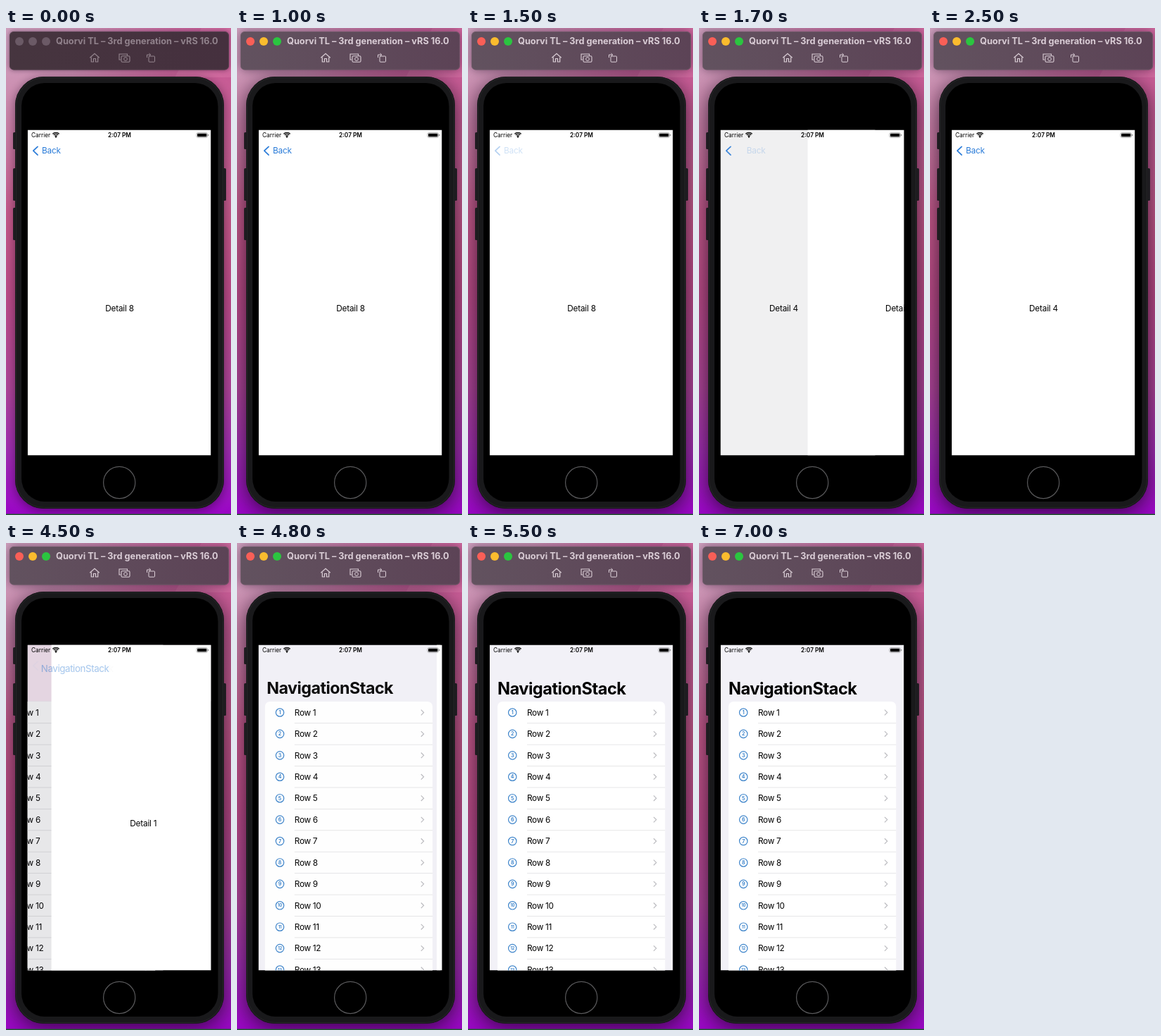
Write an HTML page with a canvas that moves like this. It is 320 by 691 pixels and loops after 7.1 s.

```html
<!DOCTYPE html>
<html lang="en">
<head>
<meta charset="utf-8">
<title>Navigation demo</title>
<style>
html, body { margin: 0; width: 100%; height: 100%; overflow: hidden; background: #a0509a; }
canvas { display: block; width: 320px; height: 691px; }
</style>
</head>
<body>
<canvas id="stage"></canvas>
<script>
const W = 320, H = 691, LOOP = 7100, STEP = 100;
const SCREEN = { x: 30.7, y: 144.5, w: 260.8, h: 462 };
const MID = 161.5, BLUE = '#2b7cd8', FONT = 'Inter, "Liberation Sans", sans-serif';
const ACTIVATE = 500;
// Each pop: time of press, start of the slide, page leaving, page below
const POPS = [
  { press: 1300, start: 1600, from: 8, to: 4 },
  { press: 3000, start: 3166, from: 4, to: 1 },
  { press: 4300, start: 4461, from: 1, to: 0 }
];
const SLIDE = 700;

const canvas = document.getElementById('stage');
const c = canvas.getContext('2d');
const dpr = window.devicePixelRatio || 1;
canvas.width = W * dpr;
canvas.height = H * dpr;

const spring = ms => { const k = 16 * ms / 1000; return 1 - (1 + k) * Math.exp(-k); };
const mix = (a, b, p) => a + (b - a) * p;

function text(str, x, y, size, o = {}) {
  c.save();
  c.font = `${o.weight || 400} ${size}px ${FONT}`;
  c.letterSpacing = (o.track || 0) + 'px';
  c.textAlign = o.align || 'left';
  c.textBaseline = 'alphabetic';
  c.globalAlpha *= o.alpha ?? 1;
  c.fillStyle = o.color || '#000';
  c.fillText(str, x, y + size * 0.36);
  c.restore();
}

function box(x, y, w, h, r, fill) {
  c.beginPath();
  c.roundRect(x, y, w, h, r);
  if (fill) { c.fillStyle = fill; c.fill(); }
}

function line(points, color, width) {
  c.beginPath();
  points.forEach(([x, y], i) => i ? c.lineTo(x, y) : c.moveTo(x, y));
  c.strokeStyle = color;
  c.lineWidth = width;
  c.stroke();
}

function ring(x, y, r, color, width, a = 0, b = Math.PI * 2) {
  c.beginPath();
  c.arc(x, y, r, a, b);
  c.strokeStyle = color;
  c.lineWidth = width;
  c.stroke();
}

function disc(x, y, r, color) {
  c.beginPath();
  c.arc(x, y, r, 0, Math.PI * 2);
  c.fillStyle = color;
  c.fill();
}

function glow(x, y, r, rgb, alpha) {
  const g = c.createRadialGradient(x, y, 0, x, y, r);
  g.addColorStop(0, `rgba(${rgb},${alpha})`);
  g.addColorStop(1, `rgba(${rgb},0)`);
  c.fillStyle = g;
  c.fillRect(0, 0, W, H);
}

function wallpaper() {
  const g = c.createLinearGradient(0, 0, 0, H);
  ['#c783ab', '#c66f9c', '#c35788', '#bb4b87', '#ae4498', '#a02cb2', '#9a04c6']
    .forEach((col, i) => g.addColorStop([0, 0.15, 0.4, 0.55, 0.74, 0.87, 1][i], col));
  c.fillStyle = g;
  c.fillRect(0, 0, W, H);
  glow(0, 20, 240, '214,192,210', 0.5);
  glow(W, 20, 230, '200,50,130', 0.5);
  c.beginPath();
  c.moveTo(278, 0); c.lineTo(W, 0); c.lineTo(W, 70); c.lineTo(240, 70);
  c.fillStyle = 'rgba(225,140,180,.25)';
  c.fill();
}

function phone(active) {
  c.save();
  c.shadowColor = active ? 'rgba(20,5,25,.75)' : 'rgba(20,5,25,.5)';
  c.shadowBlur = (active ? 30 : 15) * dpr;
  c.shadowOffsetY = (active ? 6 : 3) * dpr;
  box(13, 69, 297, 613, 41, '#19191b');
  c.restore();
  [[10, 148, 24], [10, 199, 46], [10, 255, 46], [308, 199, 46]]
    .forEach(([x, y, h]) => box(x, y, 5, h, 1.5, '#1f1c21'));
  box(13, 69, 297, 613, 41, '#19191b');
  box(14.5, 70.5, 294, 610, 40);
  c.strokeStyle = '#252527';
  c.lineWidth = 1;
  c.stroke();
  box(22, 78, 279.5, 594, 33, '#000');
  ring(161.2, 645, 22.6, '#59595b', 1.2);
}

function toolbar(active) {
  const g = c.createLinearGradient(5, 0, 317, 0);
  g.addColorStop(0, active ? '#62525f' : '#46353f');
  g.addColorStop(1, active ? '#5c4356' : '#45303e');
  c.save();
  c.shadowColor = 'rgba(20,0,25,.5)';
  c.shadowBlur = (active ? 14 : 7) * dpr;
  box(5, 5, 312, 54.5, 6, g);
  c.restore();
  box(5.5, 5.5, 311, 53.5, 6);
  c.strokeStyle = active ? '#705c6b' : '#55434f';
  c.lineWidth = 0.7;
  c.stroke();
  const lights = active ? ['#f95f57', '#fbbc2e', '#2bc540'] : ['#6b5a66', '#6b5a66', '#6b5a66'];
  lights.forEach((col, i) => disc(19 + i * 19, 19, 6, col));
  text('Quorvi TL – 3rd generation – vRS 16.0', 71, 18.5, 12.75,
    { weight: 700, color: active ? '#d9ccd5' : '#91828c' });

  const ink = active ? '#dcd0d8' : '#95868f';
  line([[119.3, 42.3], [126, 36.3], [132.7, 42.3]], ink, 1.2);
  line([[121.3, 41.5], [121.3, 48], [124.5, 48], [124.5, 43.5], [127.5, 43.5],
    [127.5, 48], [130.7, 48], [130.7, 41.5]], ink, 1.2);
  line([[163, 45], [161, 45], [161, 37], [172.5, 37], [172.5, 39]], ink, 1.1);
  box(164, 39.8, 12, 8.5, 1.5);
  c.stroke();
  ring(170, 44, 2.4, ink, 1);
  box(203, 40, 8.5, 8.2, 1);
  c.stroke();
  line([[200.5, 42], [200.5, 38], [205.5, 38]], ink, 1);
  line([[203.5, 36], [205.8, 38], [203.5, 40]], ink, 1);
}

function statusBar() {
  text('Carrier', 36, 152, 8.3);
  text('2:07 PM', MID, 152, 8.3, { weight: 600, align: 'center' });
  const up = -Math.PI / 2;
  [2.2, 4.5, 6.6].forEach(r => ring(71, 155, r, '#000', 1.4, up - 0.78, up + 0.78));
  disc(71, 154.8, 1, '#000');
  box(271, 148.7, 15.5, 6.6, 2);
  c.strokeStyle = '#8c8c8c';
  c.lineWidth = 0.7;
  c.stroke();
  box(272.1, 149.8, 13.3, 4.4, 1, '#000');
  box(287.2, 150.8, 1, 2.4, 0.5, '#8c8c8c');
}

function chevron(alpha) {
  c.save();
  c.globalAlpha = alpha;
  c.lineCap = c.lineJoin = 'round';
  line([[45, 168.3], [38.8, 174.2], [45, 180.1]], BLUE, 1.7);
  c.restore();
}

const backLabel = page => page === 1 ? 'NavigationStack' : 'Back';

function label(page, dx, alpha) {
  text(backLabel(page), 51 + dx, 174.2, 11.8, { color: BLUE, track: -0.2, alpha });
}

function list(dx) {
  c.save();
  c.translate(dx, 0);
  c.fillStyle = '#f2f1f7';
  c.fillRect(SCREEN.x, SCREEN.y, SCREEN.w, SCREEN.h);
  box(42, 225, 238.3, 420, 7, '#fff');
  for (let i = 1; i <= 13; i++) {
    const y = 240.5 + (i - 1) * 30.42;
    ring(63.2, y, 5.7, '#3d84ca', 1.2);
    text(i, 63.2, y, i > 9 ? 6 : 7,
      { weight: 600, color: '#2f7cc8', align: 'center', track: i > 9 ? -0.3 : 0 });
    text('Row ' + i, 84, y, 11.8, { track: -0.3 });
    line([[264, y - 3.8], [267.8, y], [264, y + 3.8]], '#bcbcc0', 1.2);
    c.fillStyle = '#e0e0e2';
    c.fillRect(84, y + 14.8, 196.3, 0.8);
  }
  c.restore();
}

function detail(page, dx) {
  c.fillStyle = '#fff';
  c.fillRect(SCREEN.x + dx, SCREEN.y, SCREEN.w, SCREEN.h);
  text('Detail ' + page, MID + dx, 398, 11.8, { align: 'center', track: -0.2 });
}

function largeTitle(p, alpha, color, weight) {
  const size = mix(11.8, 23.6, p);
  text('NavigationStack', mix(51, 42, p), mix(174.2, 206.6, p), size,
    { weight, color, alpha, track: size * (weight === 700 ? -0.0215 : -0.03) });
}

function pageView(page, dx) {
  if (page) detail(page, dx); else list(dx);
}

function sliding(pop, p) {
  pageView(pop.to, -0.3 * SCREEN.w * (1 - p));
  c.fillStyle = `rgba(0,0,24,${0.11 * (1 - p)})`;
  c.fillRect(SCREEN.x, SCREEN.y, SCREEN.w, SCREEN.h);
  if (!pop.to) {
    c.fillStyle = `rgba(236,208,224,${0.55 * (1 - p)})`;
    c.fillRect(SCREEN.x, SCREEN.y, SCREEN.w, 80);
  }
  detail(pop.from, SCREEN.w * p);
  if (pop.to) {
    chevron(0.9);
    c.save();
    c.beginPath();
    c.rect(42, SCREEN.y, 250, 60);
    c.clip();
    label(pop.to, -120 * (1 - p), Math.min(1, 1.2 * p));
    label(pop.from, 52 * p * (1 - p) + 8 * p, 0.4 * (1 - p));
    c.restore();
  } else {
    chevron(0.15 * Math.max(0, 1 - p * 6));
    largeTitle(p, 0.48 * (1 - p), BLUE, 400);
    largeTitle(p, p * p, '#000', 700);
  }
}

function still(page, pressed) {
  pageView(page, 0);
  if (!page) return largeTitle(1, 1, '#000', 700);
  chevron(pressed ? 0.35 : 1);
  label(page, 0, pressed ? 0.22 : 1);
}

function app(t) {
  let page = POPS[0].from;
  for (const pop of POPS) {
    if (t < pop.press) break;
    if (t < pop.start) return still(page, true);
    if (t < pop.start + SLIDE) return sliding(pop, spring(t - pop.start));
    page = pop.to;
  }
  still(page, false);
}

function draw(t) {
  const active = t >= ACTIVATE;
  c.setTransform(dpr, 0, 0, dpr, 0, 0);
  wallpaper();
  phone(active);
  toolbar(active);
  c.save();
  c.beginPath();
  c.rect(SCREEN.x, SCREEN.y, SCREEN.w, SCREEN.h);
  c.clip();
  app(t);
  statusBar();
  c.restore();
  c.fillStyle = '#1f5a2c';
  c.fillRect(0, 689.5, W, 1.5);
}

const began = performance.now();
function frame() {
  const t = (performance.now() - began) % LOOP;
  draw(Math.floor(t / STEP) * STEP);
  requestAnimationFrame(frame);
}
frame();
</script>
</body>
</html>
```
